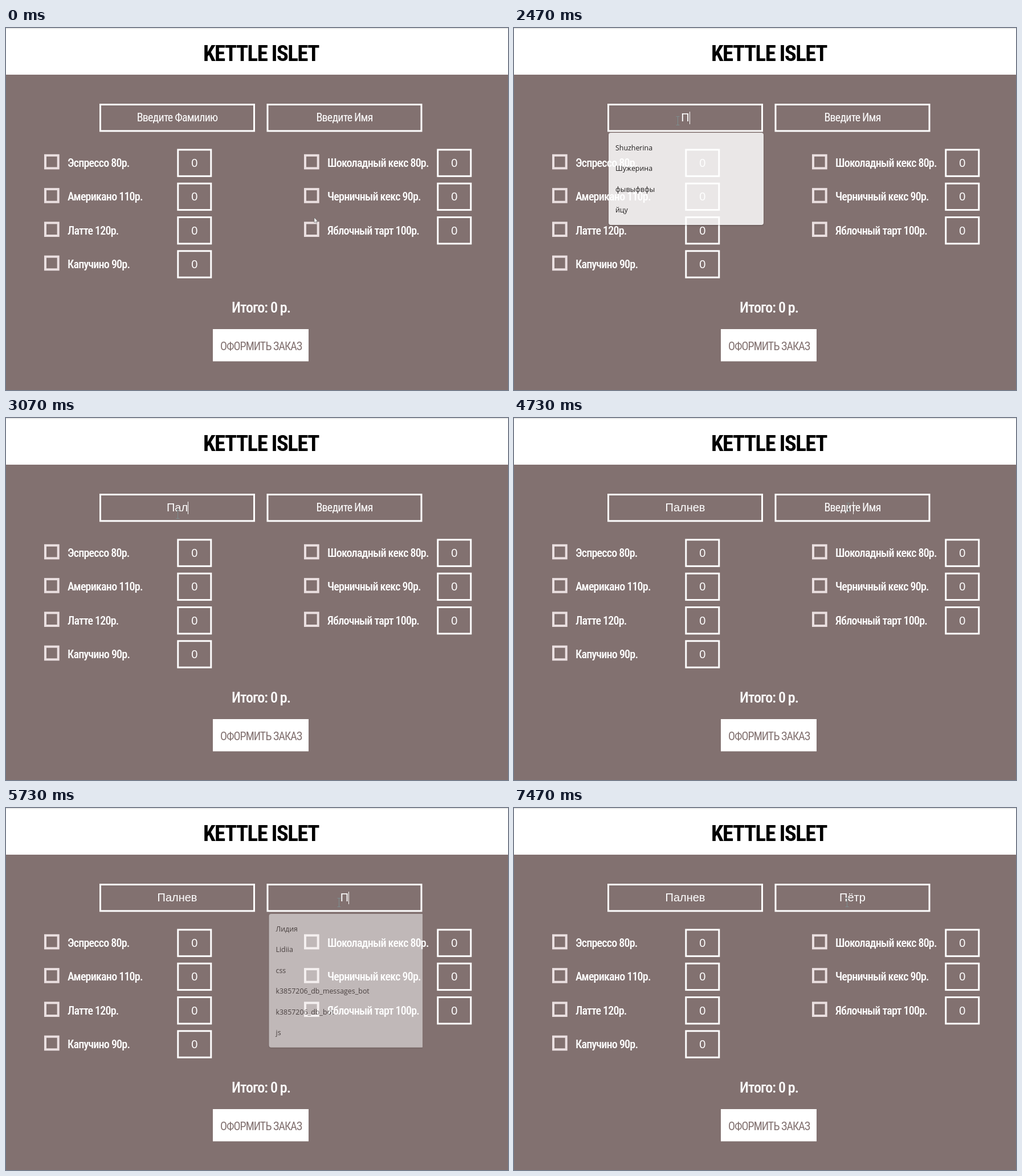
Recreate the animation shown at these times as an HTML page. Size 881 by 636 pixels, loop 8000 ms.

```html
<!DOCTYPE html>
<html lang="ru">
<head>
<meta charset="utf-8">
<title>Order form</title>
<style>
html, body { margin: 0; width: 100%; height: 100%; overflow: hidden; background: #827170; }
svg { display: block; width: 881px; height: 636px; isolation: isolate; }
text { white-space: pre; }
.narrow { font: 500 20px Oswald, "Roboto Condensed", "Open Sans", Roboto, sans-serif;
  font-stretch: 75%; letter-spacing: -.04em; fill: #fff; }
.hint { font-weight: 400; }
.title { font-size: 39px; font-weight: 600; fill: #000; }
.total { font-size: 26px; }
.order { font-weight: 400; letter-spacing: -.05em; fill: #827170; }
.input { font: 20px "Liberation Sans", Arial, sans-serif; fill: #fff; }
.item { font: 500 12.4px "Open Sans", "Noto Sans", sans-serif; fill: #111; }
.mid { text-anchor: middle; }
.menu { filter: drop-shadow(0 1px 1px rgba(0, 0, 0, .3)); }
.beam { mix-blend-mode: difference; }
</style>
</head>
<body>
<svg id="stage" viewBox="0 0 881 636"></svg>
<script>
const stage = document.getElementById('stage');
const LOOP = 8000, TICK = 200 / 3, BLINK = 530;
const ROW = 59.3, ITEM = 36.4;

function add(tag, attrs, parent = stage) {
  const el = document.createElementNS('http://www.w3.org/2000/svg', tag);
  for (const key in attrs) el.setAttribute(key, attrs[key]);
  return parent.appendChild(el);
}
function write(str, x, y, cls, parent) {
  const el = add('text', { x, y, class: cls }, parent);
  el.textContent = str;
  return el;
}
// Outer edges given; the line lies inside them.
function box(x, y, w, h, line = 3, stroke = '#fff') {
  add('rect', { x: x + line / 2, y: y + line / 2, width: w - line, height: h - line,
    fill: 'none', stroke, 'stroke-width': line });
}
function show(el, on) { el.setAttribute('visibility', on ? 'visible' : 'hidden'); }
function move(el, x, y) { el.setAttribute('transform', `translate(${x} ${y})`); }

add('rect', { width: 881, height: 636, fill: '#827170' });
add('rect', { width: 881, height: 82, fill: '#fff' });
add('rect', { width: 881, height: 1.5, fill: '#e4e4e4' });
write('KETTLE ISLET', 447.5, 58, 'narrow title mid');

function products(x, names) {
  names.forEach((name, i) => {
    const y = 212.4 + i * ROW;
    box(x, y + 9.4, 26.7, 26.6, 4, '#eadfe0');
    write(name, x + 41, y + 31.6, 'narrow');
    box(x + 233.3, y, 61, 49.4);
    write('0', x + 263.8, y + 31.6, 'input mid');
  });
}
products(67, ['Эспрессо 80р.', 'Американо 110р.', 'Латте 120р.', 'Капучино 90р.']);
products(523, ['Шоколадный кекс 80р.', 'Черничный кекс 90р.', 'Яблочный тарт 100р.']);
write('Итого: 0 р.', 447.5, 500, 'narrow total mid');
add('rect', { x: 363, y: 529, width: 168, height: 56.6, fill: '#fff' });
write('ОФОРМИТЬ ЗАКАЗ', 447.5, 566, 'narrow order mid');

// keys holds the time of each typed letter; the first one closes the menu.
const fields = [
  { x: 164, hint: 'Введите Фамилию', word: 'Палнев', focus: 940, open: 1000, blur: 4670,
    keys: [2470, 2670, 2800, 3730, 3800, 4070],
    items: ['Shuzherina', 'Шужерина', 'фывыфвфы', 'йцу'] },
  { x: 457.5, hint: 'Введите Имя', word: 'Пётр', focus: 4670, open: 4800, blur: LOOP,
    keys: [5670, 6070, 6200, 6930],
    items: ['Лидия', 'Lidiia', 'css', 'k3857206_db_messages_bot', 'k3857206_db_bot', 'js'] }
];
for (const f of fields) {
  f.mid = f.x + 136.5;
  box(f.x, 133, 273, 49.4);
  f.label = write(f.hint, f.mid, 164, 'narrow hint mid');
  f.text = write('', f.mid, 164, 'input mid');
  f.bar = add('rect', { y: 147, width: 1, height: 22, fill: '#fff' });
}

const edge = add('clipPath', { id: 'edge' });
add('rect', { width: 731, height: 636 }, edge);
for (const f of fields) {
  const holder = add('g', { 'clip-path': 'url(#edge)' });
  f.menu = add('g', { class: 'menu' }, holder);
  add('rect', { x: f.x + 1, y: 183, width: 272, height: f.items.length * ITEM + 16.4,
    rx: 4, fill: '#fff' }, f.menu);
  f.items.forEach((s, i) => write(s, f.x + 13, 214 + i * ITEM, 'item', f.menu));
}

const arrow = add('path', { d: 'M0 0V9L2 7.2L3.4 10L4.8 9.4L3.5 6.6H6Z',
  fill: '#fff', stroke: '#555', 'stroke-width': .6 });
const beam = add('path', { class: 'beam', d: 'M-3-7.5H3M0-7.5V7.5M-3 7.5H3',
  fill: 'none', stroke: '#fff' });

const glides = [
  { from: 0, to: 730, x: 297, y: 157 },
  { from: 1940, to: 2200, x: 285, y: 161 },
  { from: 2400, to: 2600, x: 292, y: 169 },
  { from: 3000, to: 3130, x: 308, y: 169 },
  { from: 4000, to: 4670, x: 586, y: 157 },
  { from: 5200, to: 5800, x: 584, y: 166 }
];
function pointerAt(t) {
  let x = 541, y = 333;
  for (const g of glides) {
    const k = Math.min(1, Math.max(0, (t - g.from) / (g.to - g.from)));
    const ease = k * k * (3 - 2 * k);
    x += (g.x - x) * ease;
    y += (g.y - y) * ease;
  }
  return [Math.round(x), Math.round(y)];
}

function drawField(f, t) {
  const pressed = f.keys.filter(at => at <= t);
  f.text.textContent = f.word.slice(0, pressed.length);
  show(f.label, !pressed.length);

  // The caret restarts its blink at every key.
  const since = t - (pressed.at(-1) ?? f.focus);
  const half = pressed.length ? f.text.getComputedTextLength() / 2 : .5;
  f.bar.setAttribute('x', Math.round(f.mid + half));
  show(f.bar, since >= 0 && t < f.blur && Math.floor(since / BLINK) % 2 === 0);

  const step = Math.round((t - f.keys[0]) / TICK);
  const opacity = step < 0 ? 1 : Math.max(0, (2.5 - step) / 3);
  const shift = Math.round(5 * (1 - opacity));
  show(f.menu, t >= f.open && opacity > 0);
  f.menu.setAttribute('opacity', opacity);
  move(f.menu, shift, shift);
}

function draw(time) {
  // The picture advances 15 times a second, on whole hundredths.
  const tick = Math.floor((time % LOOP) / TICK + .15);
  const t = Math.round(tick * TICK / 10) * 10;
  fields.forEach(f => drawField(f, t));

  const [x, y] = pointerAt(t);
  const inField = y < 182;
  move(arrow, x, y);
  move(beam, x + .5, y);
  show(arrow, !inField);
  show(beam, inField);
}

const start = performance.now();
function frame() {
  draw(performance.now() - start);
  requestAnimationFrame(frame);
}
frame();
</script>
</body>
</html>
```
